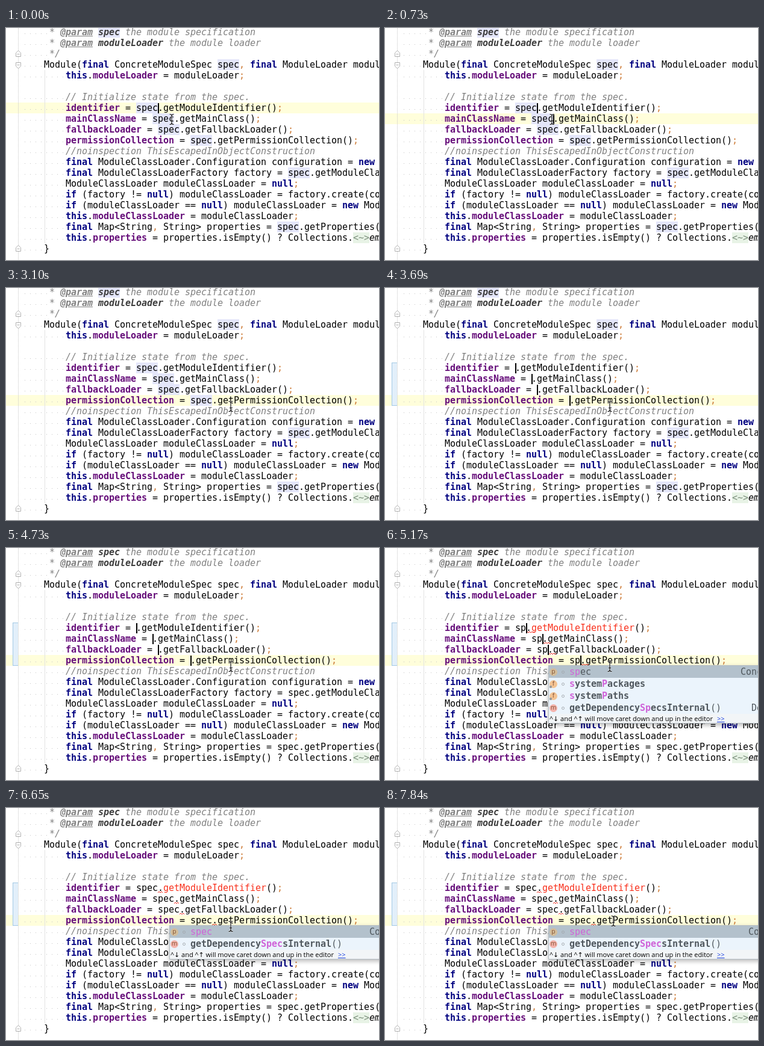
An HTML page for the animation above (7.99 s loop, 619x386 px).

```html
<!DOCTYPE html>
<html lang="en">
<head>
<meta charset="utf-8">
<title>Multiple carets in a code editor</title>
<style>
html, body { margin: 0; width: 100%; height: 100%; overflow: hidden; background: #fff; }
#stage { position: relative; width: 619px; height: 386px; overflow: hidden; background: #fff;
  font: 15px/18px "DejaVu Sans Mono", monospace; letter-spacing: -.0308px; color: #000; }
#stage div, #stage svg { position: absolute; }
.row, .item b, .item span { white-space: pre; }
.row { height: 18px; }
.dots { left: 27px; height: 18px;
  background: linear-gradient(90deg, transparent 4px, #c4c4c4 4px, #c4c4c4 5px, transparent 5px) 0 11px / 9px 1px repeat-x; }
#line { left: 0; width: 619px; height: 18px; background: #fffedb; }
#guide { left: 64px; top: 70px; width: 1px; height: 288px; background: #e2e2e2; }
#bar { left: 11px; top: 124px; width: 8px; height: 70px; background: #e2effa; border: 1px solid #a3c9e4; border-right: 0; }
.caret { width: 2px; height: 17px; background: #000; }
.k { color: #000080; font-weight: bold; }
.f { color: #660e7a; font-weight: bold; }
.o { color: #cc7832; }
.c { color: #808080; font-style: italic; }
.t { font-weight: bold; text-decoration: underline; }
.p { font-weight: bold; color: #3d3d3d; }
.s { font-style: italic; }
.z { color: #7c8f7c; background: #e8f3e6; }
.r { color: #f8301c; }
.hot .h { background: #e4e6fa; }
.h { display: inline-block; height: 18px; vertical-align: top; }
#popup { left: 271px; top: 195px; width: 420px; background: #ebf4fc; border: 1px solid #b4bcc2; box-sizing: border-box;
  box-shadow: 0 3px 7px rgba(0, 0, 0, .28); color: #50585e; }
.item { left: 0; width: 100%; height: 20px; line-height: 20px; }
.item:first-child { background: #b3c1cc; }
.item .name { left: 34px; white-space: pre; }
.item .type { white-space: pre; }
.item i { font-style: normal; color: #cf63d8; }
.icon { left: 1px; top: 4px; width: 13px; height: 13px; border-radius: 50%; text-align: center;
  font: 10px/12px "DejaVu Sans", sans-serif; color: #8a5a3c; }
.ring { left: 21px; top: 8px; width: 3px; height: 3px; border: 1px solid #a3a9ae; border-radius: 50%; }
.pin { left: 1px; top: 13px; width: 4px; height: 4px; background: #9c9c9c; border-radius: 1px; }
#hint { left: 0; width: 100%; height: 15px; background: #f2f5f7; color: #000; white-space: pre;
  font: 11px/15px "Open Sans", "DejaVu Sans", sans-serif; letter-spacing: 0; padding-left: 1px; }
#hint u { color: #1a3fe0; margin-left: 7px; }
</style>
</head>
<body>
<div id="stage">
  <div id="line"></div>
  <div id="guide"></div>
  <svg id="gutter" width="30" height="386" fill="#fff" stroke="#b2b2b2">
    <path d="M20.5 0V386" stroke="#c6c6c6" stroke-dasharray="1 1"/>
    <path d="M16.5 47.5v-6l4-4 4 4v6zM18.5 43.5h4"/>
    <path d="M16.5 57.5v6l4 4 4-4v-6zM18.5 61.5h4"/>
    <path d="M16.5 371.5v-6l4-4 4 4v6zM18.5 367.5h4"/>
  </svg>
  <div id="bar"></div>
  <div id="code"></div>
  <svg id="waves" width="619" height="386" fill="none" stroke="#f0281c"></svg>
  <div id="carets"></div>
  <div id="popup"></div>
  <svg id="mouse" width="12" height="20" fill="none">
    <g id="beam"><path d="M2.5 1.5q3 0 3.5 2 .5-2 3.5-2M2.5 18.500q3 0 3.500-2 .5 2 3.500 2M6 3V17M4 12.500h4" stroke="#fff" stroke-width="2.600" opacity=".75"/>
    <path d="M2.500 1.500q3 0 3.500 2 .5-2 3.500-2M2.500 18.500q3 0 3.500-2 .5 2 3.500 2M6 3V17M4 12.500h4" stroke="#111" stroke-width="1.200"/></g>
  </svg>
</div>
<script>
const LOOP = 7990, COL = 9, ROW = 18, LEFT = 27, FIRST = 7;
const $ = id => document.getElementById(id);
const esc = s => s.replace(/&/g, '&amp;').replace(/</g, '&lt;');
const span = (cls, s) => `<span class="${cls}">${esc(s)}</span>`;
const rowTop = i => i * ROW - 2;

const param = (name, rest) =>
  span('c', '* ') + `<span class="c t">@param</span> <span class="c p">${name}</span>` + span('c', rest);
const doc = param('<span class="h">spec</span>', ' the module specification');

// The four lines edited together: text before and after the typed word.
const edits = [
  ['identifier =', 'getModuleIdentifier'],
  ['mainClassName =', 'getMainClass'],
  ['fallbackLoader =', 'getFallbackLoader'],
  ['permissionCollection =', 'getPermissionCollection']
];

const lines = [
  [5, doc],
  [5, param('moduleLoader', ' the module loader')],
  [5, span('c', '*/')],
  [4, 'Module(final ConcreteModuleSpec spec, final ModuleLoader moduleLoader) {'],
  [8, 'this.moduleLoader = moduleLoader;'],
  [0, ''],
  [8, span('c', '// Initialize state from the spec.')],
  [8], [8], [8], [8],
  [8, span('c', '//noinspection ThisEscapedInObjectConstruction')],
  [8, 'final ModuleClassLoader.Configuration configuration = new ModuleClassLoader'],
  [8, 'final ModuleClassLoaderFactory factory = spec.getModuleClassLoaderFactory();'],
  [8, 'ModuleClassLoader moduleClassLoader = null;'],
  [8, 'if (factory != null) moduleClassLoader = factory.create(configuration);'],
  [8, 'if (moduleClassLoader == null) moduleClassLoader = new ModuleClassLoader'],
  [8, 'this.moduleClassLoader = moduleClassLoader;'],
  [8, 'final Map<String, String> properties = spec.getProperties();'],
  [8, 'this.properties = properties.isEmpty() ? Collections.<~>emptyMap()'],
  [4, '}']
];

const rules = [
  ['k', /^(final|this|new|null|if)$/],
  ['o', /^[,;]$/],
  ['h', /^spec$/],
  ['z', /^<~>$/],
  ['s', /^emptyMap$/]
];

function paint(text, red) {
  let before = '';
  return text.split(/(<~>|\w+|[,;])/).map((word, i) => {
    const field = /^\w+$/.test(word) && (before.endsWith('this.') || (!before && / =/.test(text) && edits.some(e => e[0] === word + ' =')));
    const rule = rules.find(r => r[1].test(word));
    before += word;
    if (red && word === edits[0][1]) return span('r', word);
    return field ? span('f', word) : rule ? span(rule[0], word) : esc(word);
  }).join('');
}

$('code').innerHTML = lines.map(([col, text], i) => {
  const html = text === undefined ? '' : text.startsWith('<span') ? text : paint(text);
  return `<div class="dots" style="top:${rowTop(i)}px;width:${col * COL}px"></div>` +
    `<div class="row" id="row${i}" style="top:${rowTop(i)}px;left:${LEFT + col * COL}px">${html}</div>`;
}).join('');

// Popup rows: icon, colour, name with *matched* parts, bold, type, type x.
const lookups = (n => ({
  5: [n.spec('*s*pec'), n.field('*s*ystemPackages'), n.field('*s*ystemPaths'), n.method('getDependency*S*pecsInternal', 'De'), n.method('to*S*tring', '')],
  4: [n.spec('*sp*ec'), n.field('*s*ystem*P*ackages'), n.field('*s*ystem*P*aths'), n.method('getDependency*Sp*ecsInternal', 'De')],
  2: [n.spec('*spec*', 603), n.method('getDependency*Spec*sInternal', '')]
}))({
  spec: (name, x = 590) => ['p', '#d3bd9a', name, 0, 'ConcreteModuleSpec', x],
  field: name => ['f', '#f3c393', name, 1, '', 0],
  method: (name, type) => ['m', '#f4b3ac', name, 1, type, 608]
});

function popupHtml(n) {
  const items = lookups[n].map(([icon, color, name, bold, type, x], i) => {
    const label = name.split('*').map((s, j) => j % 2 ? `<i>${s}</i>` : s).join('');
    return `<div class="item" style="top:${i * 20}px">
      <div class="icon" style="background:${color}">${icon}</div>${icon === 'f' ? '<div class="pin"></div>' : ''}
      <div class="ring"></div>
      <div class="name">${bold ? `<b>${label}</b>` : label}${icon === 'm' ? '()' : ''}</div>
      <div class="type" style="left:${x - 272}px">${type}</div></div>`;
  }).join('');
  return items + `<div id="hint" style="top:${n * 20}px">^↓ and ^↑ will move caret down and up in the editor<u>&gt;&gt;</u></div>`;
}

const at = (x, y) => ({ x, y });
const word = (w, more) => ({ word: w, on: 1, ...more });
const steps = [
  [0, { word: ' spec', carets: 1, on: 1, hot: 1, bar: 0, popup: 0, red: 0, x: 275, y: 152 }],
  [290, at(277, 152)],
  [590, { carets: 2 }],
  [740, at(280, 156)], [890, at(285, 164)], [1030, at(289, 169)],
  [1480, { carets: 3 }],
  [1630, { ...at(305, 250), on: 0 }], [1780, at(330, 345)], [1920, { ...at(343, 190), on: 1 }],
  [2220, { carets: 4 }],
  [2370, at(360, 194)], [2510, at(373, 197)],
  [3100, { on: 0 }],
  [3240, word(' spe', { bar: 1 })], [3390, word(' sp')], [3540, word(' s')], [3690, word(' ')],
  [3980, word('')],
  [4280, { hot: 0 }], [4430, { on: 0 }],
  [4730, word(' ')], [4880, word(' s')], [5020, word(' sp', { popup: 5 })],
  [5170, { popup: 4, red: 1 }],
  [5310, word(' spe')], [5460, word(' spec')], [5600, { popup: 2 }],
  [6650, { on: 0 }],
  [6940, at(388, 199)], [7090, { ...at(408, 200), on: 1 }], [7240, at(420, 198)],
  [7390, at(412, 194)], [7540, at(398, 190)], [7690, { ...at(385, 188), on: 0 }], [7840, at(379, 188)]
];
let sum = {};
const states = steps.map(([time, change]) => (sum = { ...sum, ...change, time }));

function wave(x, y, width) {
  let d = `M${x} ${y + 2}`;
  for (let i = 2; i <= width; i += 2) d += `L${x + i} ${y + (i % 4 ? 0 : 2)}`;
  return `<path d="${d}"/>`;
}

function render(s) {
  let carets = '', waves = '';
  edits.forEach(([head, call], i) => {
    const row = FIRST + i, y = rowTop(row);
    const x = LEFT + COL * (8 + head.length + s.word.length);
    $('row' + row).innerHTML = paint(`${head}${s.word}.${call}();`, s.red);
    if (s.on && i < s.carets) carets += `<div class="caret" style="left:${x}px;top:${y + 1}px"></div>`;
    if (s.red) waves += wave(x, y + 15, s.word.length < 5 ? 15 : 9);
  });
  $('carets').innerHTML = carets;
  $('waves').innerHTML = waves;
  $('stage').className = s.hot ? 'hot' : '';
  $('line').style.top = rowTop(FIRST + s.carets - 1) + 'px';
  $('bar').hidden = !s.bar;
  $('popup').hidden = !s.popup;
  if (s.popup) {
    $('popup').innerHTML = popupHtml(s.popup);
    $('popup').style.height = s.popup * 20 + 17 + 'px';
  }
  $('mouse').style.left = s.x - 6 + 'px';
  $('mouse').style.top = s.y - 10 + 'px';
}

const start = performance.now();
let shown;
function tick() {
  const t = (performance.now() - start) % LOOP;
  const state = states.filter(s => s.time <= t).pop();
  if (state !== shown) render(shown = state);
  requestAnimationFrame(tick);
}
tick();
</script>
</body>
</html>
```
